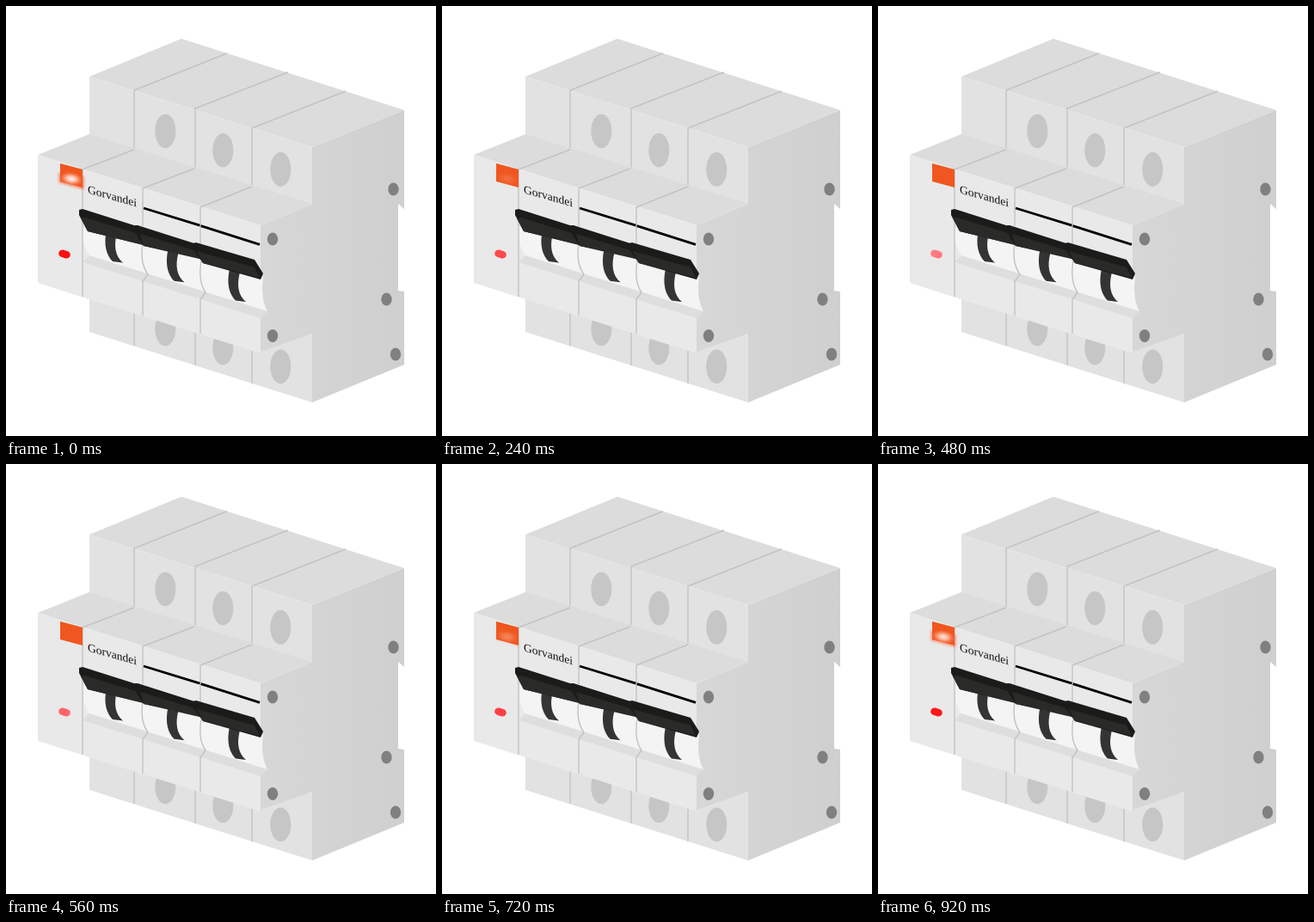
Recreate the animation shown at these times as an HTML page. Size 500 by 500 pixels, loop 960 ms.

```html
<!DOCTYPE html>
<html lang="en">
<head>
<meta charset="utf-8">
<title>Circuit breaker</title>
<style>
  html, body { margin: 0; width: 100%; height: 100%; overflow: hidden; background: #fff; }
  svg { display: block; width: 100vw; height: 100vh; }
  .seam { fill: none; stroke: #c3c3c3; stroke-width: 1.4; }
  .hole { fill: #c6c6c6; }
  .rivet { fill: #808080; }
  .brand { font: 13.5px "Liberation Serif", "Times New Roman", serif; fill: #111; }
</style>
</head>
<body>
<svg viewBox="0 0 500 500">
  <defs>
    <linearGradient id="sideFill">
      <stop offset="0" stop-color="#d7d7d7"/>
      <stop offset="1" stop-color="#cfcfcf"/>
    </linearGradient>
    <radialGradient id="shine">
      <stop offset="0" stop-color="#fff" stop-opacity=".95"/>
      <stop offset=".4" stop-color="#ffe4da" stop-opacity=".75"/>
      <stop offset="1" stop-color="#ff9468" stop-opacity="0"/>
    </radialGradient>
    <filter id="soft" x="-50%" y="-50%" width="200%" height="200%">
      <feGaussianBlur stdDeviation="1.4"/>
    </filter>
    <clipPath id="buttonClip"><path d="M63 183L89 190V211L63 204Z"/></clipPath>
  </defs>

  <!-- housing -->
  <path fill="url(#sideFill)" d="M356 164L463 121V236L456 230V331L463 332V417L356 461V381L296 404V255L356 230Z"/>
  <path fill="#dcdcdc" d="M97 82L204 38L463 121L356 164Z"/>
  <path fill="#e2e2e2" d="M97 82L356 164V231L97 151Z"/>
  <path fill="#e2e2e2" d="M97 338L296 402L356 381V461L97 379Z"/>
  <g id="holes"></g>
  <path class="seam" d="M257 55L149 98V167M328 77L220 119V189M395 99L286 142V210M149 350V395M220 375V418M286 398V439"/>
  <path fill="#dcdcdc" d="M37 173L97 149L356 230L296 255Z"/>
  <path fill="#e9e9e9" d="M37 173L296 255V404L37 322Z"/>

  <!-- switch recess -->
  <path fill="#dedede" d="M97 290L304 355L296 363L89 298Z"/>
  <path fill="#f4f4f4" d="M90 256C88 272 91 283 97 290L304 355C298 344 297 330 299 315L228 290Z"/>
  <path class="seam" d="M149 167L89 190V338M219 189L159 212V256M286 210L226 234V278"/>
  <path class="seam" d="M159 277C156 295 160 305 165 312L159 320V360M227 296C224 315 227 326 232 333L226 341V381"/>
  <g id="hooks"></g>
  <path stroke="#000" stroke-width="2.8" d="M160 235L225.4 255.2M226.6 255.6L295 277.3"/>
  <g id="levers"></g>
  <g id="rivets"></g>
  <text class="brand" transform="matrix(1 .28 0 1 95 217.5)">Gorvandei</text>

  <!-- lights -->
  <path id="halo" fill="none" stroke="#ff4a1c" stroke-width="3" filter="url(#soft)" d="M63 194V204L89 211V198"/>
  <path fill="#f0561f" d="M63 183L89 190V211L63 204Z"/>
  <g id="glow" clip-path="url(#buttonClip)">
    <ellipse cx="76" cy="201" rx="14" ry="8" transform="rotate(10 76 201)" fill="url(#shine)"/>
  </g>
  <g fill="none" stroke-linecap="round">
    <path id="ledHalo" stroke="#ff2a2a" stroke-width="11" filter="url(#soft)" d="M65.5 287.7L70.5 289.3"/>
    <path id="led" stroke-width="8.6" d="M65.5 287.7L70.5 289.3"/>
  </g>
</svg>
<script>
const $ = id => document.getElementById(id);

function add(parent, tag, attrs) {
  const el = document.createElementNS("http://www.w3.org/2000/svg", tag);
  for (const name in attrs) el.setAttribute(name, attrs[name]);
  $(parent).appendChild(el);
}

for (let i = 0; i < 3; i++) {
  const hole = { class: "hole", cx: 185.3 + 67 * i, rx: 12, ry: 19.8 };
  add("holes", "ellipse", { ...hole, cy: 145.5 + 22.2 * i });
  add("holes", "ellipse", { ...hole, cy: 375.5 + 21.9 * i });
  add("hooks", "path", {
    fill: "#343434",
    transform: `translate(${71.5 * i} ${22.8 * i})`,
    d: "M117 260C113 278 117 290 124 297L136 298.5C127 291 125 279 129 264Z"
  });
}

[
  ["M85 237L89 236L152 256L160 278L95 262L85 243Z", "M92 246L154 265L160 278L95 262L87 247Z"],
  ["M150 255L153 255L219 276L229 293L222 291L160 279L149 262Z", "M156 265L222 285L229 295L160 279Z"],
  ["M217 276L221 275L289 295L299 311L296 318L229 299L216 281Z", "M222 285L289 304L295 316L229 299Z"]
].forEach(([body, face]) => {
  add("levers", "path", { d: body, fill: "#1b1b1a" });
  add("levers", "path", { d: face, fill: "#2a2a28" });
});

for (const [cx, cy] of [[310, 271], [450.5, 213], [442.5, 341], [310, 383.5], [453, 405]])
  add("rivets", "ellipse", { class: "rivet", cx, cy, rx: 6.2, ry: 7.5 });

const LOOP = 960, STEP = 40;
const levels = [[0, 1], [240, .47], [400, .14], [480, 0], [640, .37], [720, .57], [920, .93], [960, 1]];

function levelAt(t) {
  const i = levels.findIndex(([time]) => time > t);
  const [t0, a] = levels[i - 1], [t1, b] = levels[i];
  return a + (b - a) * (t - t0) / (t1 - t0);
}

function draw(now) {
  const t = Math.floor((now % LOOP) / STEP) * STEP;
  const level = levelAt(t);
  const glow = Math.max(0, (level - .37) / .63);
  const tint = 1 - level;
  $("led").setAttribute("stroke", `rgb(255 ${Math.round(16 + 106 * tint)} ${Math.round(18 + 110 * tint)})`);
  $("ledHalo").style.opacity = glow * .6;
  $("glow").style.opacity = glow;
  $("halo").style.opacity = glow * glow * .7;
}

const start = performance.now();
function tick() {
  draw(performance.now() - start);
  requestAnimationFrame(tick);
}
tick();
</script>
</body>
</html>
```
